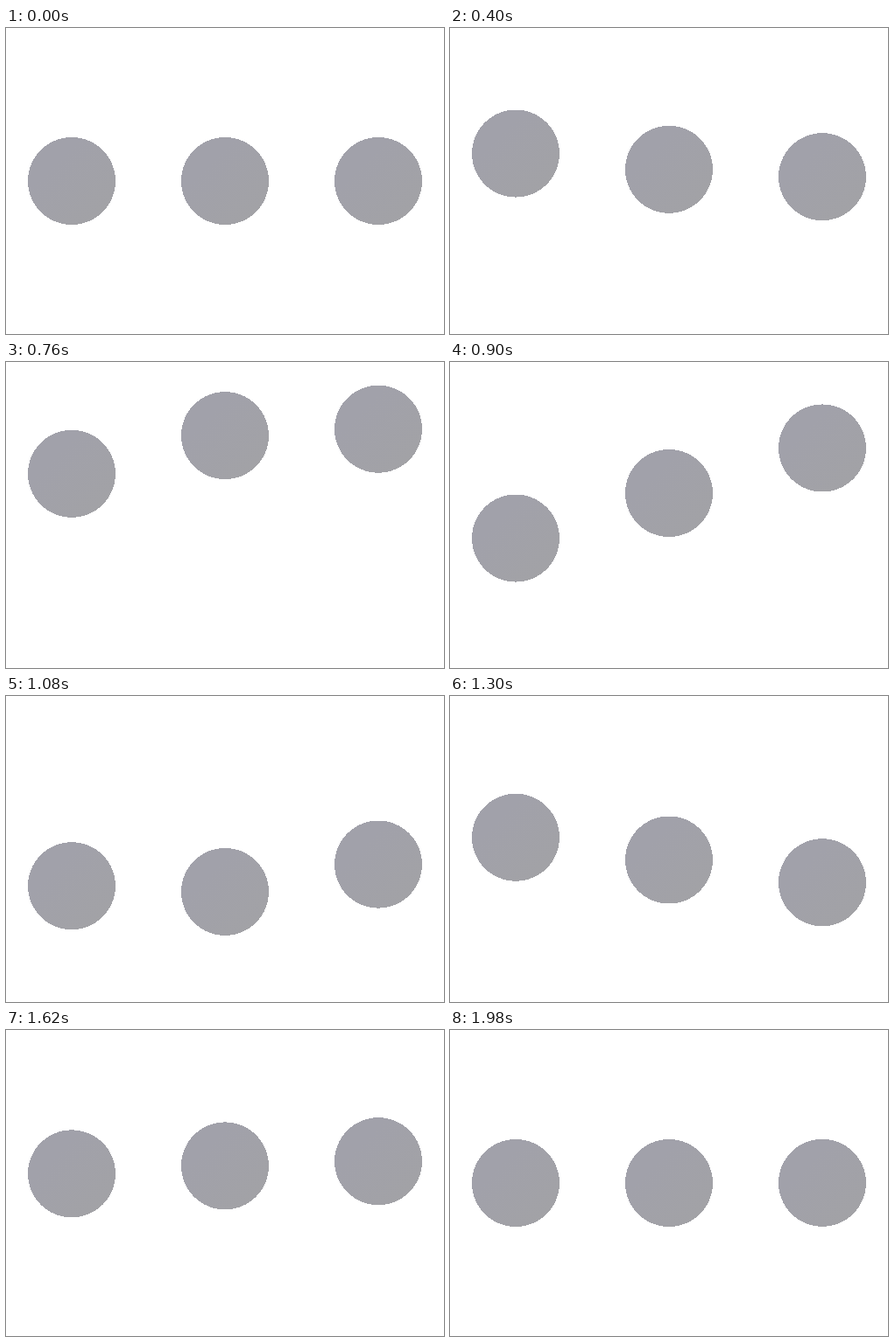
Write an HTML page that moves like this. It is 500x350 px and loops after 2 s.

```html
<!DOCTYPE html>
<html lang="en">
<head>
<meta charset="utf-8">
<title>Bouncing dots</title>
<style>
  html, body { margin: 0; width: 100%; height: 100%; overflow: hidden; background: #fff; }
  svg { display: block; width: 500px; height: 350px; }
</style>
</head>
<body>
<svg viewBox="0 0 500 350" shape-rendering="crispEdges">
  <defs>
    <linearGradient id="shade" x1="0" y1="0" x2="1" y2="1">
      <stop offset="0.3" stop-color="#a1a1aa"/>
      <stop offset="0.85" stop-color="#a2a2a6"/>
    </linearGradient>
  </defs>
  <g fill="url(#shade)">
    <circle cx="75" cy="175" r="50"/>
    <circle cx="250" cy="175" r="50"/>
    <circle cx="425" cy="175" r="50"/>
  </g>
</svg>
<script>
  const LOOP = 2000, STEP = 20, DELAY = 100, REST = 175;
  const dots = [...document.querySelectorAll('circle')];

  // Keyframes: time, offset, and the first x handle of the easing that leads there.
  const keys = [
    { t: 0, y: 0 },
    { t: 600, y: -100, x1: 1 },
    { t: 1000, y: 50, x1: 1 / 3 },
    { t: 1400, y: -25, x1: 1 / 3 },
    { t: 1800, y: 0, x1: 1 / 3 }
  ];

  // cubic-bezier(x1, 0, 2/3, 1), solved by bisection
  function ease(x, x1) {
    let lo = 0, hi = 1;
    for (let i = 0; i < 30; i++) {
      const s = (lo + hi) / 2, r = 1 - s;
      if (3 * x1 * s * r * r + 2 * s * s * r + s ** 3 < x) lo = s;
      else hi = s;
    }
    return lo * lo * (3 - 2 * lo);
  }

  function offset(t) {
    if (t <= 0) return 0;
    const i = keys.findIndex(k => k.t > t);
    if (i < 0) return 0;
    const a = keys[i - 1], b = keys[i];
    return a.y + (b.y - a.y) * ease((t - a.t) / (b.t - a.t), b.x1);
  }

  function draw(t) {
    dots.forEach((dot, i) => dot.setAttribute('cy', REST + offset(t - i * DELAY)));
  }

  const start = performance.now();
  function tick() {
    const t = (performance.now() - start) % LOOP;
    draw(Math.floor(t / STEP) * STEP);
    requestAnimationFrame(tick);
  }
  tick();
</script>
</body>
</html>
```
